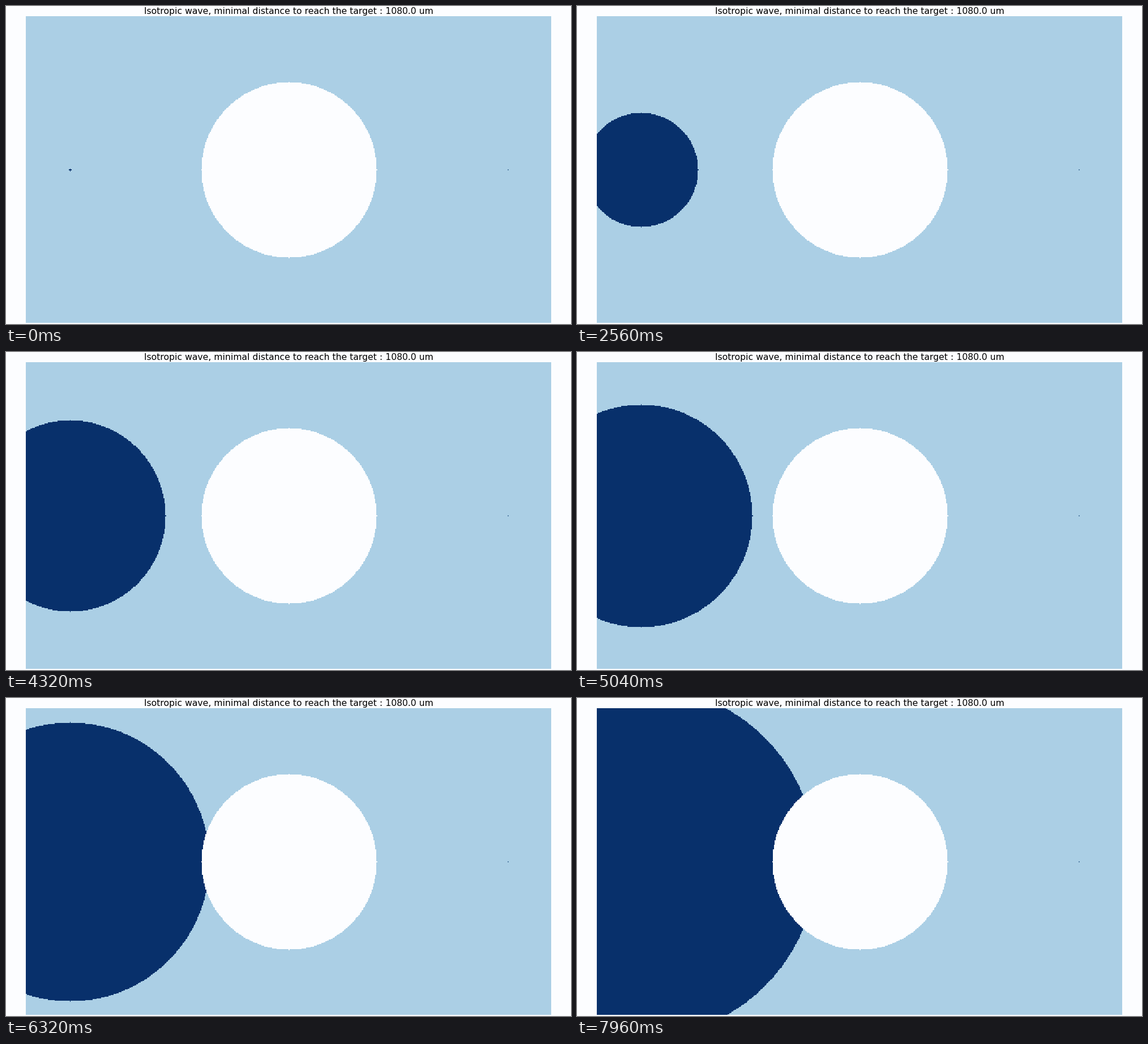
Animation, 998 px wide and 561 px high, one loop 8 s. Source, as a matplotlib script:

```python
import numpy as np
import matplotlib.pyplot as plt
from matplotlib.animation import FuncAnimation

W, H, DPI = 998, 561, 100
COLS, ROWS = 600, 350            # simulation grid
CELL = 1.5471                    # pixels per grid cell
LEFT, TOP = 35.15, 17.71         # grid corner on the stage
START, TARGET, OBSTACLE = (50, 175), (550, 175), (300, 175)
OBSTACLE_R = 100
FRAMES, INTERVAL = 200, 40

PAPER = (252, 253, 255)
MEDIUM = (171, 207, 229)
WAVE = (8, 48, 107)
GOAL = (86, 130, 168)

# Grid cell under the centre of every pixel
col = np.floor((np.arange(W) + 0.5 - LEFT) / CELL).astype(int)[None, :]
row = np.floor((np.arange(H) + 0.5 - TOP) / CELL).astype(int)[:, None]


def disc(center, radius):
    return (col - center[0]) ** 2 + (row - center[1]) ** 2 <= radius ** 2


inside = (col >= 0) & (col < COLS) & (row >= 0) & (row < ROWS)
free = inside & ~disc(OBSTACLE, OBSTACLE_R)

base = np.empty((H, W, 3), np.uint8)
base[:] = PAPER
base[free] = MEDIUM
base[disc(TARGET, 0)] = GOAL

fig = plt.figure(figsize=(W / DPI, H / DPI), dpi=DPI,
                 facecolor=np.array(PAPER) / 255)
image = fig.figimage(base, origin="upper")
fig.text(499.3 / W, 1 - 14 / H,
         "Isotropic wave, minimal distance to reach the target : 1080.0 um",
         family="DejaVu Sans", fontsize=11.26, color="black",
         ha="center", va="baseline")


def update(i):
    picture = base.copy()
    picture[free & disc(START, i + 1)] = WAVE
    image.set_data(picture)
    return [image]


anim = FuncAnimation(fig, update, frames=FRAMES, interval=INTERVAL,
                     repeat=True, repeat_delay=0, blit=False)
plt.show()
```
